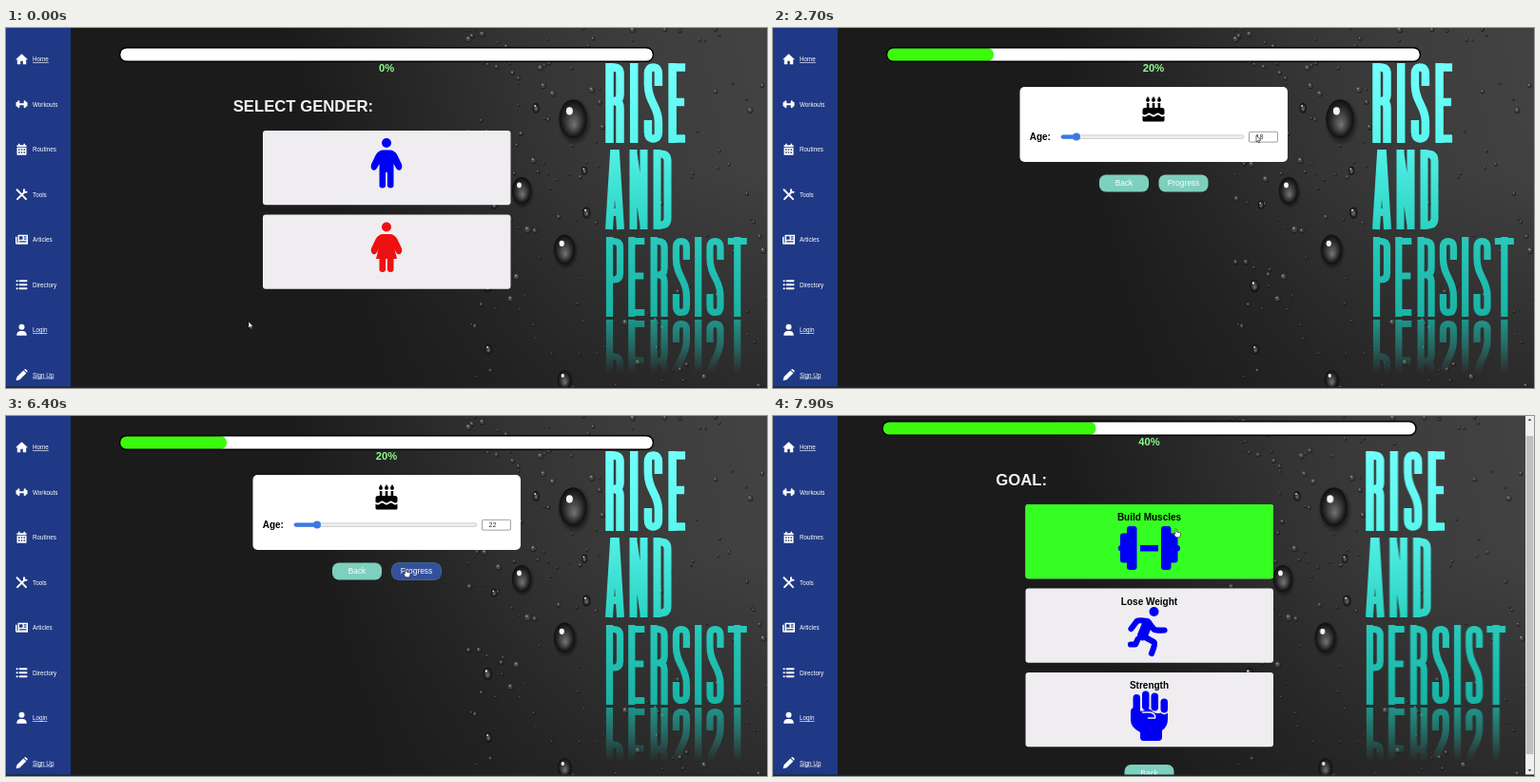
An HTML page with a canvas for the animation above (8000 ms loop, 800 px wide and 379 px high).

```html
<!DOCTYPE html>
<html lang="en">
<head>
<meta charset="utf-8">
<title>Fitness questionnaire</title>
<style>
html, body { margin: 0; width: 100%; height: 100%; overflow: hidden; background: #1c1b1c; }
canvas, svg { position: absolute; left: 0; top: 0; width: 800px; height: 379px; }
text { font-family: "Liberation Sans", Arial, sans-serif; }
.b { font-weight: bold; }
.mid { text-anchor: middle; }
.nav text { font-size: 6.3px; fill: #fff; }
.nav path { fill: #fff; fill-rule: evenodd; }
.nav .line, .limb { fill: none; stroke-linecap: round; stroke-linejoin: round; }
.nav .line { stroke: #fff; stroke-width: 2; }
.btn text { font-size: 8.4px; fill: #fff; }
.box .hover { fill: #a9ffac; }
#page2 .box .hover { fill: #35ff22; }
</style>
</head>
<body>
<canvas id="bg" width="800" height="379"></canvas>
<svg viewBox="0 0 800 379">
  <defs>
    <g id="person">
      <circle cx="400" cy="121" r="5"/>
      <path d="M396.500 128.500H403.500Q408.500 128.500 411.500 134L416 143.500Q417 148 414.500 149.500 411.500 150.500 410 147.500L407.500 143V165.500Q407.500 168.500 404.300 168.500T400.900 165.500V152H399.100V165.500Q399.100 168.500 395.700 168.500T392.500 165.500V143L390 147.500Q388.500 150.500 385.500 149.500 383 148 384 143.500L388.500 134Q391.500 128.500 396.500 128.500Z"/>
    </g>
  </defs>

  <g id="ui">
    <rect x="120" y="21" width="560" height="14" rx="7" fill="#fff"/>
    <rect id="fill" x="120" y="21" height="14" rx="6.500" fill="#3cfa0c"/>
    <rect x="119.500" y="20.700" width="561" height="14.600" rx="7.300" fill="none" stroke="#000" stroke-width="1.400"/>
    <text id="percent" class="b mid" x="400" y="46.300" font-size="11.200" fill="#8dfb8d"></text>

    <g id="page0">
      <text class="b" x="238.700" y="88.300" font-size="16.700" fill="#f3f1f3">SELECT GENDER:</text>
      <g class="box" data-y="108"></g>
      <g class="box" data-y="196.500"></g>
      <use href="#person" fill="#0000f5"/>
      <g fill="#ee1010" transform="translate(0 88.500)">
        <use href="#person"/>
        <path d="M394 134H406L411 154.500H389Z"/>
      </g>
    </g>

    <g id="page1">
      <rect x="259.500" y="62" width="281.500" height="79" rx="5" fill="#fff"/>
      <path d="M392.800 79h2.600v5h3.300v-5h2.600v5h3.300v-5h2.600v5h1.800q2.500 0 2.500 2.500v4q-2.300 2-4.600 0t-4.600 0-4.600 0-4.600 0-4.600 0v-4q0-2.500 2.500-2.500h1.800zM388.500 92.500q2.300 2 4.600 0t4.600 0 4.600 0 4.600 0 4.600 0v4.500q0 1.500-1.500 1.500h-20q-1.500 0-1.500-1.500z"/>
      <path d="M394 72q4 5 0 6-4-1 0-6zM400 72q4 5 0 6-4-1 0-6zM406 72q4 5 0 6-4-1 0-6z"/>
      <text class="b" x="269.700" y="118" font-size="10">Age:</text>
      <rect x="303" y="112.800" width="192" height="3.600" rx="1.800" fill="#efefef" stroke="#b4b4b4" stroke-width=".6"/>
      <rect id="track" x="302.700" y="112.500" height="4.200" rx="2.100" fill="#3b78e4"/>
      <circle id="thumb" cy="114.600" r="4" fill="#3b78e4"/>
      <rect id="field" x="500.500" y="109.300" width="30" height="10.800" rx="1" fill="#fff"/>
      <rect id="selection" x="507" y="110.500" width="9" height="8.500" fill="#3568cf"/>
      <text id="age" x="507.500" y="117.300" font-size="7.200"></text>
      <path id="spinner" d="M521.800 113.800l2.200-2.600 2.200 2.600zM521.800 115.600l2.200 2.600 2.200-2.600z" fill="#444"/>
      <g class="btn" data-x="343" data-y="154.500">Back</g>
      <g class="btn" data-x="405.500" data-y="154.500">Progress</g>
    </g>

    <g id="page2">
      <text class="b" x="238.700" y="88.300" font-size="16.700" fill="#f3f1f3">GOAL:</text>
      <g class="box" data-y="108">Build Muscles</g>
      <g class="box" data-y="196.500">Lose Weight</g>
      <g class="box" data-y="285">Strength</g>
      <g fill="#0000f5">
        <rect x="376.500" y="131" width="10.500" height="46" rx="3"/>
        <rect x="412.500" y="131" width="10.500" height="46" rx="3"/>
        <rect x="369.500" y="138.500" width="12" height="31" rx="3"/>
        <rect x="418" y="138.500" width="12" height="31" rx="3"/>
        <rect x="367.500" y="151" width="6" height="6.500" rx="3"/>
        <rect x="426.500" y="151" width="6" height="6.500" rx="3"/>
        <rect x="390.500" y="151" width="19" height="6.500"/>
      </g>
      <circle cx="405" cy="221" r="5" fill="#0000f5"/>
      <g class="limb" stroke="#0000f5" stroke-width="6.200">
        <path d="M381 239L387 231Q389 229.500 398 231L405 239.500Q406.500 241 416 240.500"/>
        <path d="M398 234L393 246" stroke-width="11"/>
        <path d="M394 247L405 253Q407 254.500 402.500 265"/>
        <path d="M388 250L385.500 255.500H380.500"/>
      </g>
      <g fill="#0000f5">
        <rect x="383" y="308" width="7.500" height="20" rx="3.700"/>
        <rect x="392.500" y="304.500" width="7.500" height="20" rx="3.700"/>
        <rect x="402" y="306.500" width="7.500" height="19" rx="3.700"/>
        <rect x="412" y="312.500" width="7.500" height="15" rx="3.700"/>
        <path d="M380.500 326Q381 321 385 322.500 391 328 396 324 400 321 404 326.500 408 329 412 327.500 416 331 419.500 327.500V334Q419.500 342 413.500 346V353Q413.500 357 409.500 357H394Q390.500 357 390.500 353V348Q380.500 343 380.500 335Z"/>
        <path class="limb" d="M393 327H401Q407 328 406 333H399" stroke="#efedf0" stroke-width="1.500"/>
      </g>
      <g class="btn" data-x="374" data-y="382">Back</g>
    </g>
  </g>

  <g class="nav" id="nav"><rect width="68" height="379" fill="#1f3986"/></g>

  <g id="scrollbar">
    <rect x="791" width="9" height="379" fill="#f0f0f0"/>
    <path d="M793.500 5l2-2.500 2 2.500zM793.500 372l2 2.500 2-2.500z" fill="#555"/>
    <rect id="grip" x="791.700" width="7.600" height="335" fill="#bfbfc1"/>
  </g>
  <rect y="377.500" width="800" height="1.500" fill="#20272e"/>

  <g id="cursor" stroke="#111" stroke-width=".6" fill="#fff" stroke-linejoin="round">
    <path id="arrow" d="M0 0V7L1.600 5.600 2.600 8 3.700 7.500 2.700 5.200H4.900Z"/>
    <path id="hand" d="M-.7 .7Q0-.5 .7 .7V3.500L4.500 4.300Q5.300 4.600 5.100 5.600L4.300 9.300H.3L-2.300 6Q-2.300 4.900-.7 5.800Z"/>
  </g>
</svg>

<script>
const $ = id => document.getElementById(id);
const clamp = x => Math.max(0, Math.min(1, x));
const ease = x => 1 - (1 - clamp(x)) ** 2;
const show = (id, on) => $(id).style.display = on ? '' : 'none';

// Sidebar: label, icon path, outline icon?, link?
const menu = [
  ['Home', 'M-6.500 .5L0-5.500 6.500 .5H4.700V5.500H1.300V2H-1.300V5.500H-4.700V.5Z', 0, 1],
  ['Workouts', 'M-2 0H2M-3.200-3V3M3.200-3V3M-5-1.500V1.500M5-1.500V1.500', 1, 0],
  ['Routines', 'M-5-4.500H-3.500V-6H-2V-4.500H2V-6H3.500V-4.500H5V-2.500H-5ZM-5-1.800H5V6H-5ZM-3.500-.5V1H-2V-.5ZM-.7-.5V1H.7V-.5ZM2-.5V1H3.500V-.5ZM-3.500 2.500V4H-2V2.500ZM-.7 2.500V4H.7V2.500ZM2 2.500V4H3.500V2.500Z', 0, 0],
  ['Tools', 'M-5-5L-3.500-3.500 4.500 4.800M-4.500 4.800L2.500-2M2.500-5V-2.500H5', 1, 0],
  ['Articles', 'M-4-5H6.500V5H-5Q-6.500 5-6.500 3.500V-3H-5V3.500H-4ZM-2.500-3.500V0H1V-3.500ZM2.300-3.500V-2.300H5V-3.500ZM2.300-1.200V0H5V-1.200ZM-2.500 1.500V2.700H5V1.500Z', 0, 0],
  ['Directory', 'M-5-4H-4.800M-2-4H5M-5 0H-4.800M-2 0H5M-5 4H-4.800M-2 4H5', 1, 0],
  ['Login', 'M0-6A3 3 0 0 1 0 0A3 3 0 0 1 0-6ZM-5.300 6Q-5.300 1.300-1 1.300H1Q5.300 1.300 5.300 6Z', 0, 1],
  ['Sign Up', 'M-6 6L-5 2 1.800-4.800 4.800-1.800-2 5ZM2.500-5.500L3.500-6.200Q4.200-6.500 6-4.500 6.500-4 5.500-2.500Z', 0, 1]
];
$('nav').innerHTML += menu.map(([label, d, line, link], i) =>
  `<g transform="translate(16.500 ${32.800 + i * 47.500})"><path d="${d}" class="${line ? 'line' : ''}"/>
   <text x="11.500" y="2.300" ${link ? 'text-decoration="underline"' : ''}>${label}</text></g>`).join('');

// Choice boxes and buttons get a hover layer
document.querySelectorAll('.box').forEach(g => {
  const y = +g.dataset.y, label = g.textContent;
  const rect = `<rect x="270" y="${y}" width="260.500" height="78.200" rx="3"`;
  g.innerHTML = `${rect} fill="#efedf0"/>${rect} class="hover" opacity="0"/>
    <text class="b mid" x="400" y="${y + 17.300}" font-size="10">${label}</text>`;
});
document.querySelectorAll('.btn').forEach(g => {
  const x = +g.dataset.x, y = +g.dataset.y, label = g.textContent;
  const rect = `<rect x="${x}" y="${y}" width="52" height="18" rx="7"`;
  g.innerHTML = `${rect} fill="#7dcfbe"/>${rect} class="hover" fill="#34519b" opacity="0"/>
    <text class="mid" x="${x + 26}" y="${y + 11.700}">${label}</text>`;
});

// Background: dark gradient, water drops, condensed lettering
const c = $('bg').getContext('2d');
function gradient(g, ...stops) {
  stops.forEach((s, i) => g.addColorStop(i / (stops.length - 1), s));
  return g;
}
c.fillStyle = gradient(c.createLinearGradient(340, 200, 800, 90), '#1c1b1c', '#272727', '#343434', '#3d3d3d', '#424242');
c.fillRect(0, 0, 800, 379);
c.fillStyle = gradient(c.createLinearGradient(0, 150, 0, 379), '#1c1b1c00', '#1c1b1c90');
c.fillRect(0, 0, 800, 379);

function oval(x, y, rx, ry, fill) {
  c.fillStyle = fill;
  c.beginPath();
  c.ellipse(x, y, rx, ry, 0, 0, 7);
  c.fill();
}
function drop(x, y, r) {
  c.save();
  c.translate(x, y);
  c.scale(r, r * 1.4);
  oval(.12, .15, 1.25, 1.2, gradient(c.createRadialGradient(.1, .15, .7, .1, .15, 1.250), '#0b0b0bd0', '#0b0b0b00'));
  oval(0, 0, 1, 1, gradient(c.createRadialGradient(.1, .35, 0, 0, 0, 1), '#757575', '#505050', '#2c2c2c', '#0e0e0e'));
  oval(-.25, -.4, .24, .2, '#f4f4f4');
  c.restore();
}
let seed = 11;
const rnd = () => (seed = seed * 16807 % 2147483647) / 2147483647;
for (let i = 0; i < 170; i++) {
  const x = 485 + 315 * rnd() ** 1.400, y = 379 * rnd() ** 1.300, r = .8 + 2.200 * rnd() ** 3;
  oval(x + .4, y + .6, r + .5, r + .7, '#151515b0');
  oval(x, y, r, r * 1.100, '#444');
  oval(x - r * .2, y - r * .3, r * .35, r * .35, '#a0a0a0');
}
[[596, 95.500, 14.500], [542, 171, 10], [587, 233, 11], [506, 271, 4.500], [587, 370, 7],
 [610, 194, 4], [557, 84, 3.500], [608, 150, 3], [513, 186, 3], [507, 338, 3.500]].forEach(d => drop(...d));

const glyphs = {
  I: 'M4.500 0V84',
  R: 'M4.500 0V84M4.500 4.500H9Q15.500 4.500 15.500 11V33Q15.500 40 9 40H4.500M9 40Q15.500 40 15.500 47V84',
  P: 'M4.500 0V84M4.500 4.500H9Q15.500 4.500 15.500 11V38Q15.500 45 9 45H4.500',
  S: 'M15.500 24V11Q15.500 4.500 10 4.500T4.500 11V22C4.500 42 15.500 44 15.500 62V73Q15.500 79.500 10 79.500T4.500 73V60',
  E: 'M4.500 0V84M4.500 4.500H18M4.500 41H17M4.500 79.500H18',
  A: 'M4 84L9 4H11L16 84M5 66H15',
  N: 'M4.500 0V84M15.500 0V84M4.500 4L15.500 80',
  D: 'M4.500 0V84M4.500 4.500H8Q15.500 4.500 15.500 12V72Q15.500 79.500 8 79.500H4.500',
  T: 'M10 0V84M0 4.500H20'
};
function word(text, y, gap, weight, colors, flip = 1) {
  c.save();
  c.translate(630, y);
  c.scale(1, flip);
  c.lineWidth = weight;
  c.strokeStyle = gradient(c.createLinearGradient(0, 0, 0, 84), ...colors);
  for (const ch of text) {
    c.stroke(new Path2D(glyphs[ch]));
    c.translate((ch === 'I' ? 9 : 20) + gap, 0);
  }
  c.restore();
}
word('RISE', 37, 5.700, 8.500, ['#72fffb', '#58f6ec']);
word('AND', 128, 5, 8, ['#52f0e6', '#2bd2c3']);
word('PERSIST', 220, 3.300, 7.200, ['#28c9bb', '#17b3a4']);
word('PERSIST', 391, 3.300, 7.200, ['#1bb5a600', '#1bb5a600', '#1bb5a670', '#1bb5a6c0'], -1);

// Timeline
const ageOpens = 1240, goalOpens = 6490;
const path = [
  [0, 255, 309], [200, 255, 309], [600, 414, 180], [700, 421.500, 123.500], [1000, 421, 126], [1250, 420, 128],
  [1400, 412, 149], [1900, 445, 130], [2700, 508, 113], [3200, 518, 114], [3500, 517, 114],
  [3900, 310, 108], [4100, 295, 107], [5000, 295, 107], [5600, 340, 142], [6200, 414, 158],
  [6400, 420, 160.500], [6600, 419, 160], [7000, 368, 133], [7100, 364.500, 129.500], [7300, 366, 130],
  [7700, 421, 120], [7900, 423.500, 118.500], [8000, 423.500, 118.500]
];
function cursorAt(t) {
  const i = path.findIndex(p => p[0] > t), [t0, x0, y0] = path[i - 1], [t1, x1, y1] = path[i];
  const k = (t - t0) / (t1 - t0);
  return [x0 + (x1 - x0) * k, y0 + (y1 - y0) * k];
}
function hover(page, i, amount) {
  $('page' + page).querySelectorAll('.hover')[i].setAttribute('opacity', amount);
}

function draw(t) {
  const page = t < ageOpens ? 0 : t < goalOpens ? 1 : 2, goal = page === 2;
  for (let i = 0; i < 3; i++) show('page' + i, i === page);
  const scroll = 15 * clamp((t - 7750) / 150) ** 2;
  $('ui').setAttribute('transform', goal ? `translate(-4.500 ${-scroll})` : '');
  $('bg').style.width = (goal ? 791 : 800) + 'px';
  show('scrollbar', goal);
  $('grip').setAttribute('y', 7 + scroll * .93);

  $('percent').textContent = page * 20 + '%';
  $('fill').setAttribute('width', 112 * (ease((t - ageOpens) / 600) + ease((t - goalOpens) / 500)));

  const age = t < 4700 ? 18 : t < 5000 ? 2 : 22;
  const x = 307 + 2 * Math.max(0, age - 12), focus = t >= 3300 && t < 5600, selected = t >= 3600 && t < 4700;
  $('age').textContent = age;
  $('age').setAttribute('fill', selected ? '#fff' : '#333');
  $('thumb').setAttribute('cx', x);
  $('track').setAttribute('width', x - 302.700);
  $('field').setAttribute('stroke', focus ? '#111' : '#777');
  $('field').setAttribute('stroke-width', focus ? 1.300 : .7);
  show('selection', selected);
  show('spinner', focus);

  hover(0, 0, ease((t - 550) / 150));
  hover(1, 1, ease((t - 6100) / 250));
  hover(2, 0, ease((t - goalOpens) / 500));

  const [cx, cy] = cursorAt(t);
  const hand = page === 1 ? t >= 6100 : cx > 270 && cy < 275;
  $('cursor').setAttribute('transform', `translate(${cx} ${cy})`);
  show('hand', hand);
  show('arrow', !hand);
}

const start = performance.now();
function tick() {
  const t = (performance.now() - start) % 8000;
  draw(Math.floor(t / 100) * 100);
  requestAnimationFrame(tick);
}
tick();
</script>
</body>
</html>
```
